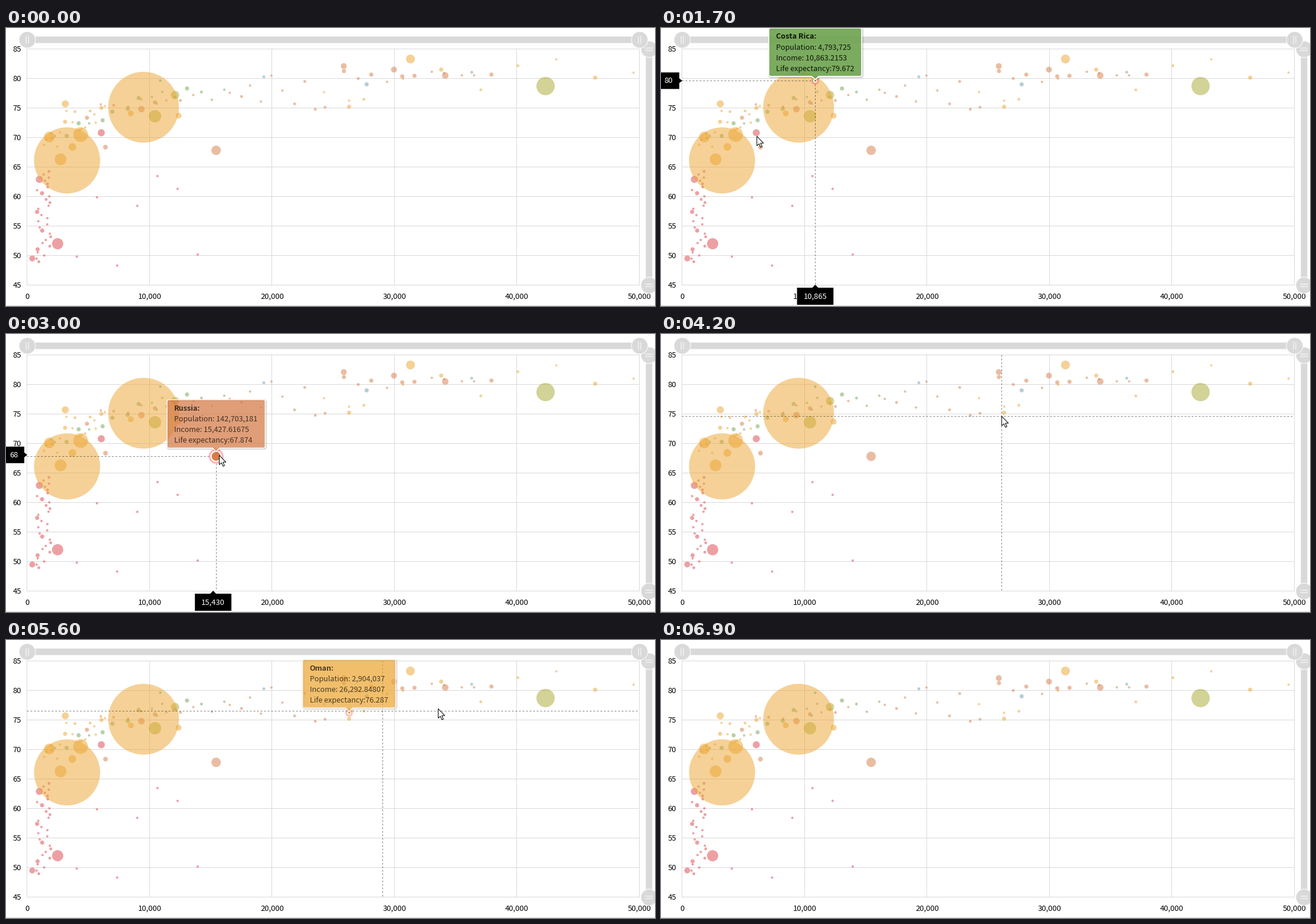
Animation, 1100 px wide and 471 px high, one loop 7500 ms. Source, as a matplotlib script:

```python
import numpy as np
import matplotlib.pyplot as plt
from matplotlib.animation import FuncAnimation
from matplotlib.patches import Circle, Polygon, Rectangle

W, H, DPI = 1100, 471, 100
STEP, LOOP = 100, 7500
PX = 72 / DPI
LEFT, TOP, RIGHT, BOTTOM = 35.5, 35.5, 1073.5, 435.5
CROSS_LAG, TAG_LAG, TIP_LAG = 133, 200, 280
FADE_IN, FADE_OUT = 200, 220
GREY = "#d9d9d9"

ORANGE, SALMON, RED = "#eca530", "#d67c48", "#dd434b"
OLIVE, GREEN, BLUE = "#a9a730", "#6fa450", "#6f9fa8"

plt.rcParams["font.family"] = ["Noto Sans CJK JP", "DejaVu Sans"]
plt.rcParams["path.snap"] = False

fig = plt.figure(figsize=(W / DPI, H / DPI), dpi=DPI, facecolor="white")
ax = fig.add_axes([0, 0, 1, 1])
ax.set_xlim(0, W)
ax.set_ylim(H, 0)
ax.axis("off")
renderer = fig.canvas.get_renderer()

# name: colour, population, income, life expectancy, radius
COUNTRIES = {
    "China": (ORANGE, "1,353,600,687", 9501.57825, 75.178, 60),
    "India": (ORANGE, "1,258,350,971", 3252.87164, 66.168, 56),
    "United States": (OLIVE, "317,505,266", 42336.7429, 78.762, 15.5),
    "Russia": (SALMON, "142,703,181", 15427.61675, 67.874, 8),
    "Ukraine": (SALMON, "44,940,268", 6389.58597, 68.414, 4),
    "Saudi Arabia": (ORANGE, "28,705,133", 26289.6347, 75.264, 3.5),
    "Costa Rica": (GREEN, "4,793,725", 10863.2153, 79.672, 2),
    "Oman": (ORANGE, "2,904,037", 26292.84807, 76.287, 2),
}

# The most populous unnamed bubbles: x, y, radius
BUBBLES = {
    ORANGE: [(126, 180, 12.5), (92, 222, 10), (73, 184, 9), (112, 201, 6.5),
             (100, 128, 6), (211, 144, 5), (292, 148, 5), (685, 52, 7.5)],
    SALMON: [(229, 137, 5.5), (572, 64, 5), (657, 70, 5), (744, 80, 5.5)],
    RED: [(87, 365, 9.5), (44, 390, 5), (56, 256, 6), (161, 177, 6)],
    OLIVE: [(252, 149, 10.5), (286, 113, 7)],
}

# Small dots around the income curve: colour, count, x range, spread in y
BANDS = [
    (ORANGE, 18, 62, 165, 14),
    (GREEN, 14, 100, 370, 11),
    (SALMON, 9, 138, 320, 11),
    (SALMON, 10, 380, 540, 20),
    (SALMON, 11, 570, 820, 6),
    (ORANGE, 9, 540, 1065, 18),
    (BLUE, 5, 80, 790, 6),
]

# Hover runs: stops (country, start) and the time the run ends
RUNS = [
    ([("Russia", 750), ("China", 820), ("Costa Rica", 1380),
      ("India", 1780), ("Ukraine", 2240)], 2250),
    ([("Russia", 2840)], 3350),
    ([("Saudi Arabia", 4260), ("Oman", 4960)], 5550),
    ([("United States", 5950)], 6350),
]
# Pointer path: time, x, y
PATH = np.array([
    (200, 1062, 180), (500, 743, 253), (700, 478, 210), (1000, 254, 116),
    (1300, 254, 116), (1800, 140, 200), (2240, 168, 203), (2300, 255, 189),
    (2840, 331, 195), (3000, 361, 205), (3350, 361, 205), (4200, 577, 139),
    (5550, 588, 122), (5600, 732, 116), (6350, 940, 100), (6500, 1062, 95)])
ENTER, LEAVE = 200, 6700


def spot(name):
    _, _, income, life, _ = COUNTRIES[name]
    return np.array([LEFT + income * 0.02075, TOP + (85 - life) * 10]) + 0.5


def mouse(t):
    return np.array([np.interp(t, PATH[:, 0], PATH[:, k]) for k in (1, 2)])


def lerp(a, b, f):
    return a + (b - a) * min(1, max(0, f))


def crisp(v):
    return np.floor(v) + 0.5


def rgb(colour):
    return np.array([int(colour[k:k + 2], 16) / 255 for k in (1, 3, 5)])


def label(x, y, s, size=13, **kw):
    return ax.text(x, y, s, fontsize=size * PX, **kw)


def width(txt):
    return txt.get_window_extent(renderer).width


def line(xs, ys, colour=GREY, px=1, **kw):
    return ax.plot(xs, ys, color=colour, lw=px * PX, **kw)[0]


def dot(x, y, r, colour):
    ax.add_patch(Circle((x, y), r, fc=colour, ec="none", alpha=0.5, zorder=2))


def draw_grid():
    for k in range(9):
        y = TOP + 50 * k
        line((LEFT, RIGHT), (y, y), zorder=1)
        label(26, y + 4, str(85 - 5 * k), ha="right")
    for k in range(6):
        x = crisp(LEFT + 207.5 * k)
        line((x, x), (TOP, BOTTOM), zorder=1)
        label(x + 0.5, 459, f"{10000 * k:,}", ha="center")
    line((0, W), (470.5, 470.5))


def draw_grip(x, y, dx, dy):
    ax.add_patch(Circle((x, y), 14, fc=GREY, ec="white", lw=PX, zorder=3))
    for s in (-2, 2):
        line((x + s * dy - 6 * dx, x + s * dy + 6 * dx),
             (y + s * dx - 6 * dy, y + s * dx + 6 * dy), "white", zorder=3)


def draw_scrollbars():
    for x, y, w, h in ((36, 14.5, 1038, 11), (1084.5, 36, 11, 400)):
        ax.add_patch(Rectangle((x, y), w, h, fc=GREY, ec="none", zorder=3))
    for y in (36, 436):
        draw_grip(1090, y, 1, 0)
    for x in (36, 1074):
        draw_grip(x, 20, 0, 1)


def draw_dots():
    rng = np.random.default_rng(4)

    def size():
        return rng.choice([2, 2, 2, 2.4, 3.5])

    for colour, n, x0, x1, spread in BANDS:
        for x in np.linspace(x0, x1, n) + rng.uniform(-3, 3, n):
            # life expectancy grows with the logarithm of income
            y = 334 - 39 * np.log(x - LEFT) + rng.normal(0, spread)
            dot(x, max(50, y), size(), colour)
    for y in np.linspace(243, 396, 30):
        dot(rng.uniform(46, 76), y, size(), RED)
    for x in np.linspace(120, 325, 7):
        dot(x, rng.uniform(245, 415), 2, RED)
    for colour, points in BUBBLES.items():
        for x, y, r in points:
            dot(x + 0.5, y + 0.5, r, colour)
    for name, (colour, *_, r) in COUNTRIES.items():
        dot(*spot(name), r, colour)


overlay = []


def keep(artist):
    overlay.append(artist)
    return artist


def patch(p):
    return keep(ax.add_patch(p))


def current(run, t):
    return max((k for k, (_, s) in enumerate(run) if s <= t), default=0)


def cross_pos(t, lag):
    """Crosshair position and the hovered country, if any."""
    for run, end in RUNS:
        if not run[0][1] <= t < end + lag:
            continue
        k = current(run, t)
        name, start = run[k]
        if t >= end:
            return lerp(spot(name), mouse(t), (t - end) / lag), None
        origin = spot(run[k - 1][0]) if k else mouse(start)
        return lerp(origin, spot(name), (t - start) / lag), name
    return mouse(t), None


def draw_cross(t):
    pos, name = cross_pos(t, CROSS_LAG)
    x, y = crisp(pos)
    fade = 0.5 * min(1, (LEAVE + 200 - t) / 300)
    style = dict(alpha=fade, ls=(0, (3, 3)), zorder=2.5, dash_capstyle="butt")
    keep(line((LEFT, x if name else RIGHT), (y, y), "black", **style))
    keep(line((x, x), (y if name else TOP, BOTTOM), "black", **style))
    if name:
        draw_axis_tags(*cross_pos(t, TAG_LAG)[0], name)


def draw_axis_tags(x, y, name):
    _, _, income, life, _ = COUNTRIES[name]
    style = dict(color="white", ha="center", zorder=5)
    keep(label(13, y + 4, f"{life:.0f}", **style))
    w = width(keep(label(x, 459, f"{income + 2:,.0f}", **style))) / 2 + 11
    boxes = ([(0, y - 14), (31, y - 14), (31, y - 4), (36, y), (31, y + 4),
              (31, y + 14), (0, y + 14)],
             [(x - w, 440), (x - 5, 440), (x, 435), (x + 5, 440),
              (x + w, 440), (x + w, 469), (x - w, 469)])
    for pts in boxes:
        patch(Polygon(pts, fc="black", ec="none", zorder=4.5))


def draw_hovers(t):
    for run, end in RUNS:
        stops = [start for _, start in run[1:]] + [end]
        for (name, start), stop in zip(run, stops):
            level = 1 - max(0, t - stop) / 300
            if t < start or level <= 0:
                continue
            colour, *_, r = COUNTRIES[name]
            p = spot(name)
            if t < stop or stop == end:
                for extra, a in ((2.5, 0.4), (4, 0.2)):
                    patch(Circle(p, r + extra, fill=False, ec="#ff5050",
                                 lw=2.5 * PX, alpha=a * level, zorder=3.4))
            patch(Circle(p, r, fc=colour, ec="none", alpha=level, zorder=3.5))
            patch(Circle(p, r + 0.5, fill=False, ec="white", lw=2 * PX,
                         alpha=level, zorder=3.5))


def tip_of(name):
    return spot(name) - (0, COUNTRIES[name][4])


def draw_tooltip(t):
    for run, end in RUNS:
        first = run[0][1]
        alpha = min(1, (t - first) / FADE_IN, 1 - (t - end) / FADE_OUT)
        if alpha <= 0:
            continue
        k = current(run, t)
        name, start = run[k]
        before = run[max(0, k - 1)][0]
        f = (t - start) / TIP_LAG
        tip = lerp(tip_of(before), tip_of(name), f)
        fill = lerp(rgb(COUNTRIES[before][0]), rgb(COUNTRIES[name][0]), f)
        draw_balloon(tip, fill, name, alpha)


def draw_balloon(tip, fill, name, alpha):
    _, pop, income, life, _ = COUNTRIES[name]
    rows = [f"{name}:", f"Population: {pop}",
            f"Income: {income:,.5f}".rstrip("0"), f"Life expectancy:{life:.3f}"]
    texts = [keep(label(0, 0, s, 12.6, weight="normal" if k else "bold",
                        alpha=alpha * 0.88, zorder=7))
             for k, s in enumerate(rows)]
    w, h = max(map(width, texts)) + 25, 82
    x, y = tip
    left = max(37, x - w / 2)
    right = left + w
    top = y - 6 - h
    flip = top < -8
    top = y + 6 if flip else max(0, top)
    low = top + h
    up = [(x - 6, top), (x, y), (x + 6, top)] if flip else []
    down = [] if flip else [(x + 6, low), (x, max(y, low)), (x - 6, low)]
    pts = ([(left, top + 2), (left + 2, top)] + up
           + [(right - 2, top), (right, top + 2), (right, low - 2),
              (right - 2, low)] + down + [(left + 2, low), (left, low - 2)])
    shade = [(px + 1, py + 1) for px, py in pts]
    patch(Polygon(shade, fill=False, ec="black", lw=4 * PX,
                  alpha=0.16 * alpha, zorder=6))
    patch(Polygon(pts, fc=fill, ec="none", alpha=0.92 * alpha, zorder=6))
    patch(Polygon(pts, fill=False, ec="white", lw=1.8 * PX,
                  alpha=alpha, zorder=6))
    for k, txt in enumerate(texts):
        txt.set_position((left + 12, top + 18.5 + 18 * k))


def draw_pointer(t):
    arrow = np.array([(0, 0), (0, 16), (3.7, 12.6), (6.3, 18.6), (8.8, 17.5),
                      (6.2, 11.6), (11.3, 11.6)])
    patch(Polygon(arrow + crisp(mouse(t)), fc="white", ec="black", lw=PX,
                  zorder=9))


def update(i):
    while overlay:
        overlay.pop().remove()
    t = i * STEP
    if ENTER <= t < LEAVE + 200:
        draw_cross(t)
        draw_hovers(t)
        draw_tooltip(t)
        if t < LEAVE:
            draw_pointer(t)
    return overlay


draw_grid()
draw_scrollbars()
draw_dots()
anim = FuncAnimation(fig, update, frames=LOOP // STEP, interval=STEP,
                     init_func=lambda: [], repeat=True, repeat_delay=0,
                     blit=False)
plt.show()
```
